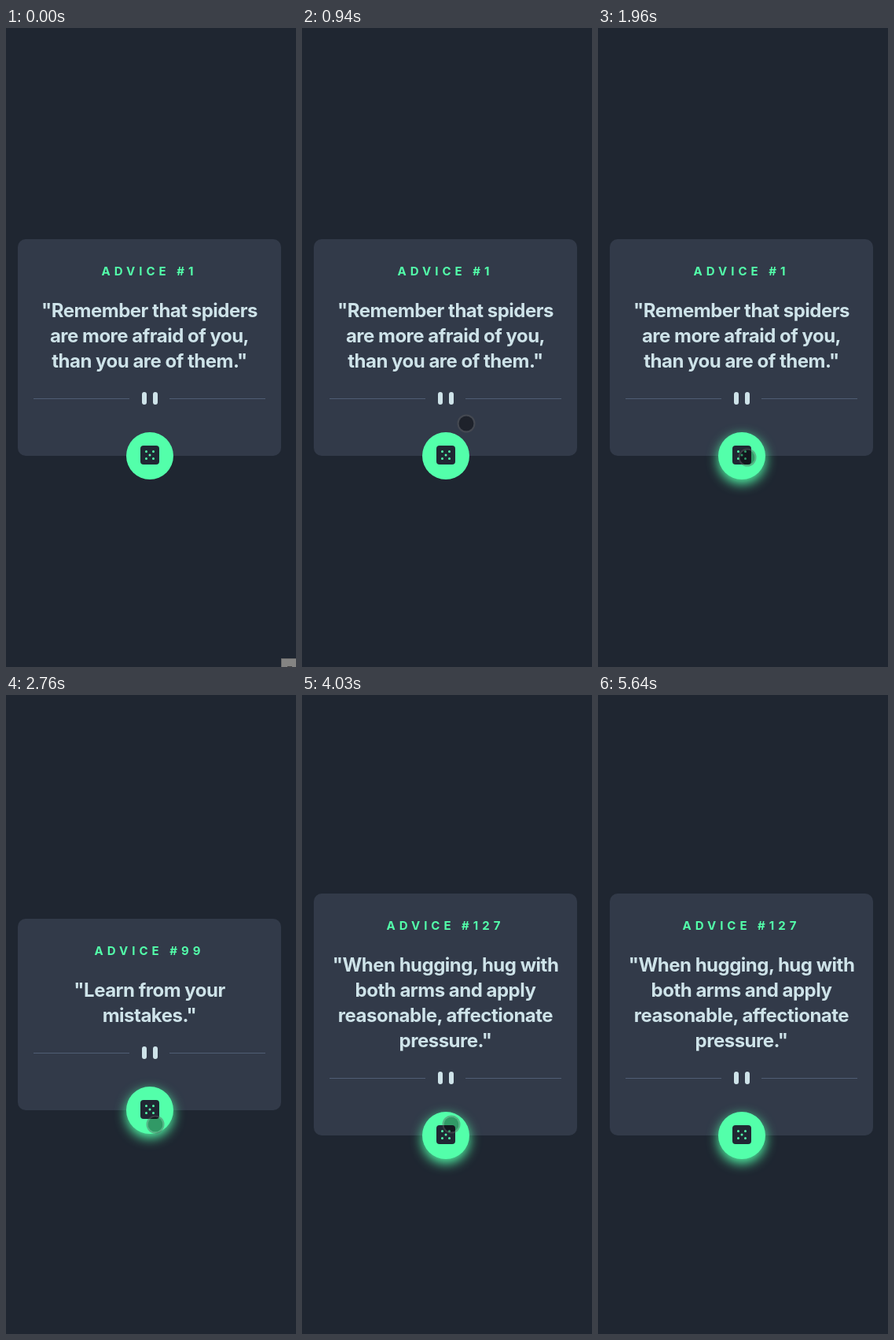
Animation of 369x811 px, one loop 6.17 s. Source, as an HTML page:

```html
<!DOCTYPE html>
<html lang="en">
<head>
<meta charset="utf-8">
<title>Advice</title>
<style>
  html, body { margin: 0; width: 100%; height: 100%; overflow: hidden; background: #1f2631; }
  body { position: relative; font-family: Inter, "Open Sans", sans-serif; }
  .card {
    position: absolute; left: 15px; width: 335px;
    border-radius: 10px; background: #323a49; text-align: center;
  }
  h1 {
    position: absolute; top: 30px; left: 0; width: 100%; margin: 0;
    font-size: 15px; line-height: 21px; font-weight: 700;
    letter-spacing: 5px; color: #53ffaa; white-space: nowrap;
  }
  p {
    position: absolute; top: 75px; left: 0; width: 100%; margin: 0;
    font-size: 24px; line-height: 32px; font-weight: 700;
    letter-spacing: -.5px; color: #cee3e9; white-space: pre;
  }
  .rule { position: absolute; left: 20px; bottom: 65px; }
  .button {
    position: absolute; left: 138px; bottom: -30px; width: 60px; height: 60px;
    border-radius: 50%; background: #53ffaa;
  }
  .button.lit { box-shadow: 0 5px 15px #53ffaa; }
  .button svg { position: absolute; left: 18px; top: 17px; }
  .touch {
    position: absolute; left: -11.5px; top: -11.5px; width: 23px; height: 23px;
    box-sizing: border-box; border: 2px solid rgba(92, 92, 92, .45);
    border-radius: 50%; background: rgba(0, 0, 0, .4) padding-box;
  }
  .touch.down { background-color: rgba(180, 170, 0, .7); border-color: rgba(160, 145, 0, .65); }
  .corner {
    position: absolute; left: 350px; top: 800px; width: 19px; height: 11px;
    box-sizing: border-box; background: #848483;
    border: solid #6c6c6c; border-width: 1px 0 0 1px;
  }
  .corner::after {
    content: ""; position: absolute; left: 7px; top: 9px;
    width: 6px; height: 1px; background: #444;
  }
</style>
</head>
<body>
<div class="card" id="card">
  <h1 id="title"></h1>
  <p id="quote"></p>
  <svg class="rule" width="295" height="16">
    <path fill="#4f5d74" d="M0 8h122v1H0zM173 8h122v1H173z"/>
    <g fill="#cee3e9">
      <rect x="138" width="6" height="16" rx="3"/>
      <rect x="152" width="6" height="16" rx="3"/>
    </g>
  </svg>
  <div class="button" id="button">
    <svg width="24" height="24">
      <rect width="24" height="24" rx="4" fill="#202733"/>
      <g fill="#53ffaa">
        <circle cx="7.5" cy="7.5" r="1.5"/>
        <circle cx="16.5" cy="7.5" r="1.5"/>
        <circle cx="12" cy="12" r="1.5"/>
        <circle cx="7.5" cy="16.5" r="1.5"/>
        <circle cx="16.5" cy="16.5" r="1.5"/>
      </g>
    </svg>
  </div>
</div>
<div class="touch" id="touch"></div>
<div class="corner" id="corner"></div>
<script>
  const LOOP = 6170;
  const $ = id => document.getElementById(id);
  const [card, title, quote, button, touch, corner] =
    ['card', 'title', 'quote', 'button', 'touch', 'corner'].map($);

  const advice = [
    { at: 0, id: 1, lines: ['"Remember that spiders', 'are more afraid of you,', 'than you are of them."'] },
    { at: 2760, id: 99, lines: ['"Learn from your', 'mistakes."'] },
    { at: 3960, id: 127, lines: ['"When hugging, hug with', 'both arms and apply', 'reasonable, affectionate', 'pressure."'] }
  ];

  // Each move visits evenly timed points in a fixed number of steps.
  const moves = [
    { from: 260, to: 870, steps: 10, pts: [[321.5, 766.5], [299, 688], [264, 585], [233.5, 504.5]] },
    { from: 940, to: 1490, steps: 9, pts: [[208.5, 501.5], [190, 514], [181, 528], [182, 540], [189.5, 544.5]] },
    { from: 4970, to: 5570, steps: 9, pts: [[194.5, 552.5], [207, 602], [228, 672], [251, 740], [270.5, 789.5]] }
  ];

  const within = (t, a, b) => t >= a && t < b;
  const current = (list, key, t) => list.filter(e => e[key] <= t).pop();

  function place({ from, to, steps, pts }, t) {
    const n = steps - 1;
    const k = Math.min(n, Math.floor((t - from) / (to - from) * n + 1e-6));
    const u = k / n * (pts.length - 1);
    const i = Math.min(pts.length - 2, Math.floor(u));
    return pts[i].map((v, d) => v + (pts[i + 1][d] - v) * (u - i));
  }

  let shown;
  function showAdvice(item) {
    if (item === shown) return;
    shown = item;
    const height = 179 + 32 * item.lines.length;
    card.style.height = height + 'px';
    card.style.top = 405.5 - height / 2 + 'px';
    title.textContent = 'ADVICE #' + item.id;
    quote.textContent = item.lines.join('\n');
  }

  function draw(t) {
    showAdvice(current(advice, 'at', t));
    corner.hidden = t >= 70;
    button.classList.toggle('lit', t >= 1960);
    touch.classList.toggle('down', within(t, 1890, 1960) || within(t, 3690, 3820));
    touch.hidden = !within(t, 260, 5640);
    if (!touch.hidden) {
      const [x, y] = place(current(moves, 'from', t), t);
      touch.style.transform = `translate(${x}px, ${y}px)`;
    }
  }

  const start = performance.now();
  function tick() {
    draw((performance.now() - start) % LOOP);
    requestAnimationFrame(tick);
  }
  tick();
</script>
</body>
</html>
```
